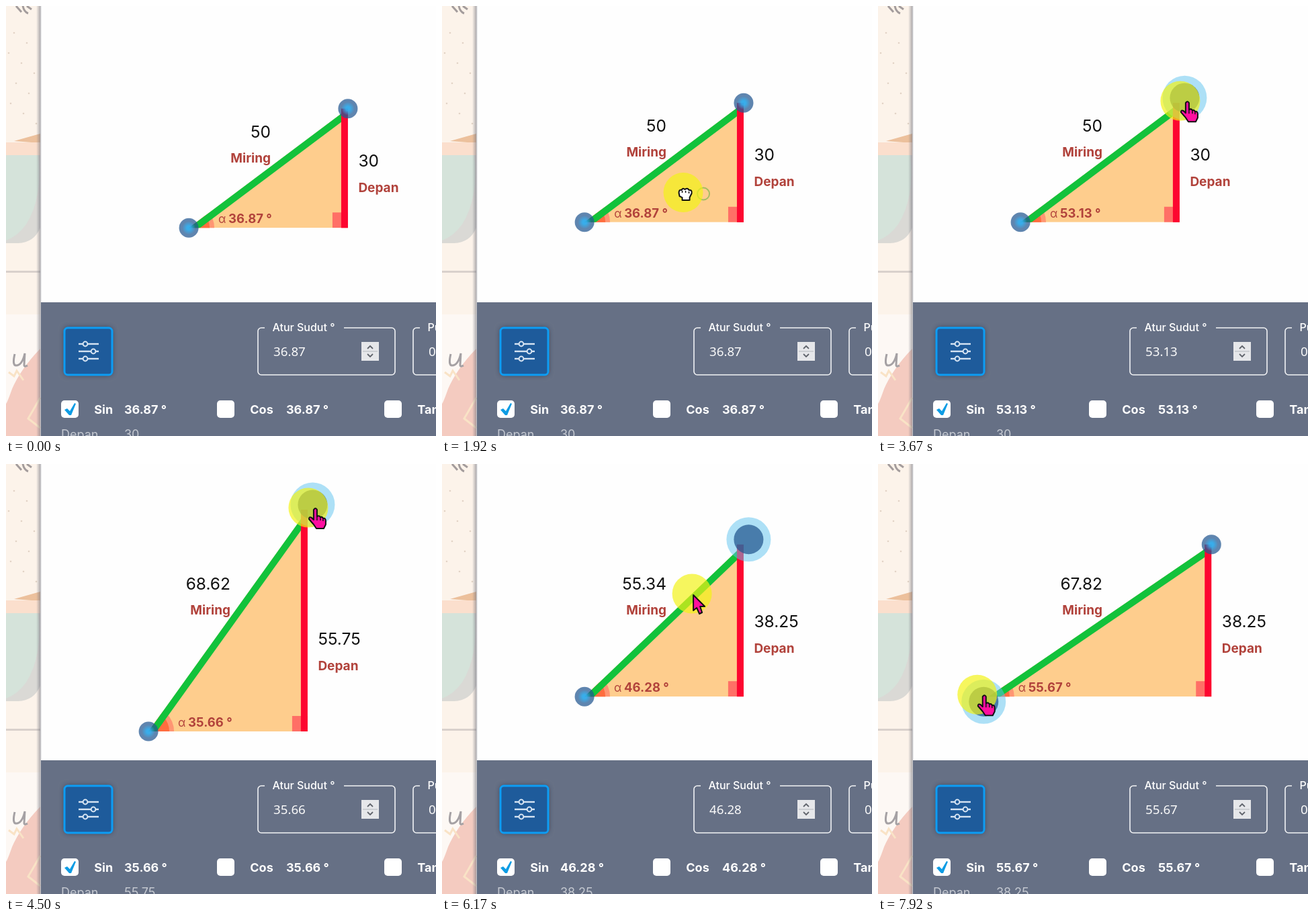
These frames come from a looping animation (640x640 px, 8000 ms). An HTML page with a canvas:

```html
<!DOCTYPE html>
<html lang="id">
<head>
<meta charset="utf-8">
<title>Segitiga</title>
<style>
  html, body { margin: 0; width: 100%; height: 100%; overflow: hidden; background: #fefefe; }
  canvas { display: block; width: 640px; height: 640px; }
</style>
</head>
<body>
<canvas id="stage" width="640" height="640"></canvas>
<script>
const ctx = document.getElementById('stage').getContext('2d');
const LOOP = 8000, STEP = 1000 / 12, UNIT = 5.92;
const SANS = 'Inter, Lato, sans-serif';
const PANEL = '#667085', LABEL = '#b1423b', PINK = '#ff0f9f';

const ramp = (t, from, to) => Math.min(1, Math.max(0, (t - from) / (to - from)));
const mix = (a, b, k) => a.map((v, i) => v + (b[i] - v) * k);

function text(str, x, y, font, color, align = 'left') {
  ctx.font = font;
  ctx.fillStyle = color;
  ctx.textAlign = align;
  ctx.fillText(str, x, y);
}

function shape(d, fill, stroke, width = 2) {
  const path = new Path2D(d);
  if (fill) { ctx.fillStyle = fill; ctx.fill(path); }
  if (stroke) { ctx.strokeStyle = stroke; ctx.lineWidth = width; ctx.stroke(path); }
}

function rect(x, y, w, h, color) {
  ctx.fillStyle = color;
  ctx.fillRect(x, y, w, h);
}

function roundBox(x, y, w, h, fill, stroke, width) {
  ctx.beginPath();
  ctx.roundRect(x, y, w, h, 5);
  if (fill) { ctx.fillStyle = fill; ctx.fill(); }
  if (stroke) { ctx.strokeStyle = stroke; ctx.lineWidth = width; ctx.stroke(); }
}

function disc(x, y, r, fill, stroke) {
  ctx.beginPath();
  ctx.arc(x, y, r, 0, 7);
  if (fill) { ctx.fillStyle = fill; ctx.fill(); }
  if (stroke) { ctx.strokeStyle = stroke; ctx.lineWidth = 2; ctx.stroke(); }
}

function drawSideStrip() {
  rect(0, 0, 51, 640, '#fcf3ea');
  for (let i = 0; i < 10; i++) disc((i * 19 + 12) % 46, 40 + i * 15, 1.3, '#e2d3c6');
  shape('M15 0l8 9M25 0q2 9 8 11M31 0l7 5', null, '#a39c9c', 3);
  shape('M12 201L51 190V204Z', '#ecc09c');
  rect(0, 203, 51, 19, '#fbdfcd');
  shape('M0 222H51V330Q42 352 18 353H0Z', '#dad9d5');
  shape('M0 222H48Q55 285 30 325Q18 342 0 349Z', '#d5e3da');
  rect(0, 394, 51, 3, '#d9d1cc');
  rect(0, 459, 51, 181, '#fdf8f4');
  shape('M51 510Q22 540 9 570Q2 590 0 592V640H51Z', '#f4cbc0');
  shape('M13 518q-4 17 2 17q9 0 13-18l-1 17q0 4 5 1', null, '#a5a1a4', 3);
  shape('M4 545l8 6 4-8 10 14M51 583L33 614L51 628', null, '#f9e3c6', 3);
  const edge = ctx.createLinearGradient(45, 0, 53, 0);
  edge.addColorStop(0, 'rgba(115,115,125,0)');
  edge.addColorStop(.75, 'rgba(115,115,125,.55)');
  edge.addColorStop(1, 'rgba(115,115,125,0)');
  rect(45, 0, 8, 640, edge);
}

function drawField(x, label, gap, value) {
  roundBox(x, 479, 204, 70, null, '#f2f3f5', 1.6);
  rect(x + 10, 475, gap, 8, PANEL);
  text(label, x + 21.5, 484, '500 16px ' + SANS, '#fff');
  text(value, x + 23, 521, '18.7px "Noto Sans", sans-serif', '#fafafa');
}

function drawPanel(angle, opposite) {
  rect(52, 441, 588, 199, PANEL);
  ctx.save();
  ctx.shadowColor = 'rgba(25,35,60,.7)';
  ctx.shadowBlur = 8;
  roundBox(87, 479, 71, 70, '#1e5b9b');
  ctx.restore();
  roundBox(87, 479, 71, 70, null, '#0d9df4', 3);
  for (let row = 0; row < 3; row++) {
    const y = 503 + row * 11, knob = row === 1 ? 130 : 118;
    shape(`M108 ${y}H138`, null, '#d5e3f2', 2.4);
    disc(knob, y, 3.4, '#1e5b9b', '#d5e3f2');
  }

  drawField(375, 'Atur Sudut °', 118, angle);
  drawField(606, 'Putar', 80, '0');
  rect(529, 500, 26, 28, '#e6e7ea');
  shape('M538 510l4-4 4 4M538 518l4 4 4-4', null, '#60646c', 1.8);
  rect(531, 513.5, 22, 1, '#b4b7be');

  const bold = '700 18px ' + SANS;
  [['Sin', 82, 176], ['Cos', 314, 417], ['Tan', 563, 667]].forEach(([name, x, angleX]) => {
    roundBox(x, 587, 26, 26, '#fff');
    text(name, x + 49.3, 607, bold, '#fff');
    text(angle + ' °', angleX, 607, bold, '#fff');
  });
  shape('M87 601L91 599L95 603L102 591L104 592L97 609H94Z', '#0d9ce4');
  text('Depan', 82, 644, '18px ' + SANS, '#c5c9d1');
  text(opposite, 176, 644, '18px ' + SANS, '#c5c9d1');
}

// A focused handle grows outwards from its corner, along (side, -side).
function drawHandle(x, y, grow, side) {
  const cx = x + side * 7.5 * grow, cy = y - side * 7.5 * grow;
  if (grow) disc(cx, cy, 15 + 18 * grow, 'rgba(95,195,240,.5)');
  disc(cx, cy, 14.5 + 7.5 * grow, 'rgba(35,88,145,.73)');
  if (grow < .5) {
    const glow = ctx.createRadialGradient(cx, cy, 3, cx, cy, 10);
    glow.addColorStop(0, 'rgba(50,180,245,.85)');
    glow.addColorStop(1, 'rgba(50,180,245,0)');
    disc(cx, cy, 10, glow);
  }
}

function drawTriangle(t, { cx, cy, base, height, left, right, top, bottom }, angle) {
  ctx.save();
  ctx.beginPath();
  ctx.moveTo(left, bottom);
  ctx.lineTo(right, top);
  ctx.lineTo(right, bottom);
  ctx.closePath();
  ctx.clip();
  rect(left, top, right - left, bottom - top, '#fecd8d');
  disc(left, bottom, 38, '#ff9673');
  disc(left, bottom, 31, '#ff6d3f');
  rect(right - 23, bottom - 23, 23, 23, '#ff6f66');
  shape(`M${left} ${bottom}L${right} ${top}`, null, '#12c23b', 20);
  ctx.restore();
  rect(right - 10, top, 10, bottom - top, '#fd0630');

  const leftFocus = ramp(t, 6750, 6850);
  drawHandle(left, bottom, leftFocus, -1);
  drawHandle(right, top, ramp(t, 2800, 3000) - leftFocus, 1);

  const number = '24.5px ' + SANS, label = '700 19px ' + SANS;
  const sideY = bottom - (bottom - top) / 4 - 47;
  text(+Math.hypot(base, height).toFixed(2), cx + 3.5, cy - 46, number, '#111', 'right');
  text('Miring', cx + 3.5, cy - 9, label, LABEL, 'right');
  text(height, right + 15.5, sideY, number, '#111');
  text('Depan', right + 15.5, sideY + 38, label, LABEL);
  text('α', left + 44, bottom - 7, '17px ' + SANS, LABEL);
  text(angle + ' °', left + 59, bottom - 7, '700 18.5px ' + SANS, LABEL);

  if (t > 830 && t < 1950) disc(cx + 58.5, cy + 46.5, 9, null, '#a3bd62');
}

// The pointer enters, drags the whole triangle, then its top and left corners.
function drawPointer(t, { cx, cy, left, right, top, bottom }, slide) {
  let spot = mix([690, 590], [cx + 31, cy + 47], ramp(t, 80, 830));
  spot = mix(spot, [right + 11, top - 1], ramp(t, 2170, 2720));
  spot = mix(spot, [left - 7, bottom - 1], ramp(t, 5830, 6830));
  const grabbing = t > 800 && t < 2000;
  const pointing = (t > 2750 && t < 5850) || t > 6780;
  const lead = 36 * Math.sin(Math.PI * slide);

  ctx.save();
  ctx.translate(...spot);
  ctx.lineJoin = 'round';
  disc((pointing ? -10 : -2) - lead, -2 - lead, 29.5, 'rgba(243,243,20,.68)');
  if (grabbing) {
    shape('M-9-2q0-5 4-4q2-4 5-1q4-3 6 1q5-1 4 5l-3 6v4H-4v-4l-4-2Z', '#fff', '#111');
    shape('M-4-5v3M1-5v3M6-4v3', null, '#111', 1.5);
  } else if (pointing) {
    shape('M-2 1q3-4 5 0v10q3-2 5 1q3-1 4 2q4-1 4 4v5l-3 6H2l-4-6l-7-8q0-4 4-2l3 3Z', PINK, '#111');
    shape('M3 11v6M8 12v5M12 14v4', null, '#111', 1.5);
  } else {
    shape('M0 0V23L5 19L9 28L13 26L10 17H17Z', PINK, '#111');
  }
  ctx.restore();
}

function triangleAt(t, slide) {
  const cx = 390.5 - 60 * slide - 15 * Math.sin(Math.PI * slide);
  const cy = 241.5 - 8.5 * slide;
  const rise = 25.75 * ramp(t, 3670, 4500) - 17.5 * ramp(t, 5000, 5750);
  const height = 30 + Math.round(rise * 4) / 4;
  const base = 40 + Math.round(16 * ramp(t, 6920, 7920));
  const halfW = base * UNIT / 2, halfH = height * UNIT / 2;
  return { cx, cy, base, height, left: cx - halfW, right: cx + halfW, top: cy - halfH, bottom: cy + halfH };
}

function draw(now) {
  const t = Math.floor((now % LOOP + 6) / STEP) * STEP;
  const slide = ramp(t, 1170, 1920);
  const triangle = triangleAt(t, slide);
  const alpha = Math.atan2(triangle.height, triangle.base) * 180 / Math.PI;
  // Grabbing a corner switches the readout to the complementary angle.
  const angle = +(t < 3500 ? alpha : 90 - alpha).toFixed(2);

  rect(0, 0, 640, 640, '#fefefe');
  drawSideStrip();
  drawTriangle(t, triangle, angle);
  drawPanel(angle, triangle.height);
  drawPointer(t, triangle, slide);
}

const start = performance.now();
(function tick() {
  draw(performance.now() - start);
  requestAnimationFrame(tick);
})();
</script>
</body>
</html>
```
